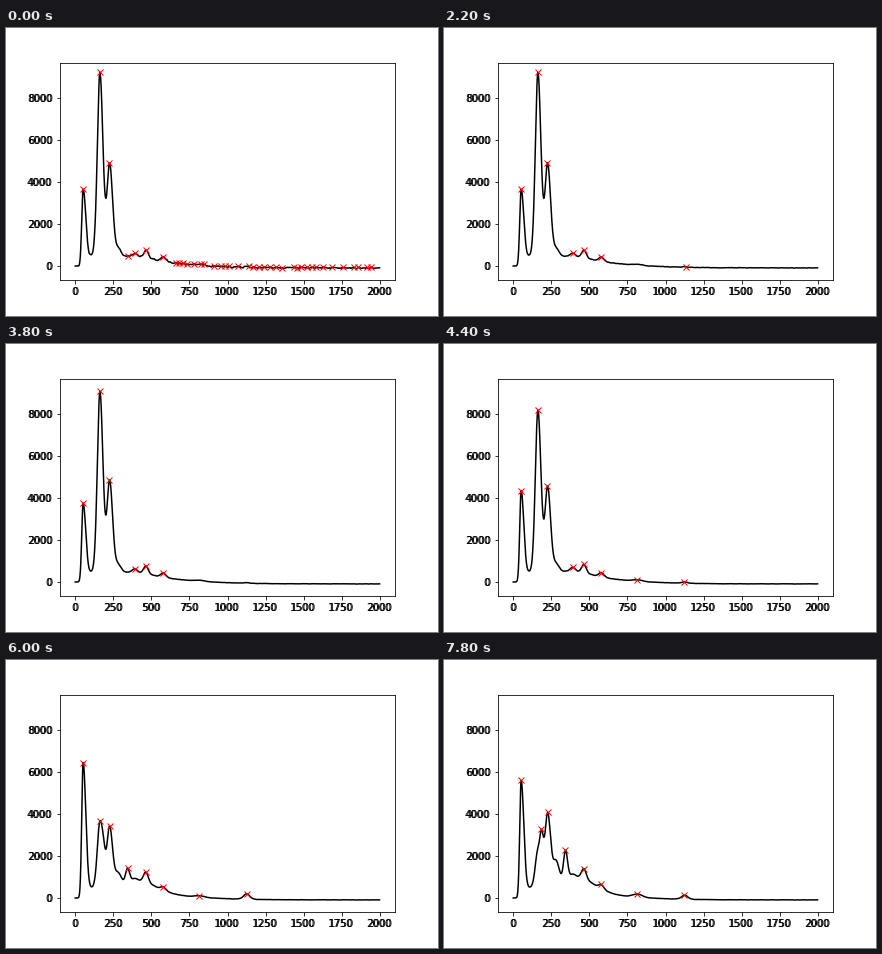
A matplotlib script for the animation above (8 s loop, 432 by 288 pixels).

```python
import numpy as np
import matplotlib.pyplot as plt
from matplotlib.animation import FuncAnimation

FRAMES = 40
INTERVAL = 200
MIN_PROMINENCE = 25

# Each peak: centre, width, then its height at the four stages
PEAKS = np.array([
    (52, 25, 3640, 6180, 6430, 5580),
    (162, 28, 8720, 4950, 3100, 1730),
    (187, 18, 0, 250, 700, 1690),
    (226, 27, 4380, 3150, 2850, 3450),
    (280, 29, 370, 430, 560, 1050),
    (343, 19, 0, 40, 650, 1360),
    (390, 26, 190, 280, 120, 150),
    (420, 160, 100, 300, 500, 680),
    (463, 23, 380, 480, 490, 485),
    (578, 24, 200, 195, 150, 190),
    (815, 45, 45, 130, 70, 150),
    (1125, 30, 20, 150, 250, 190)])

x = np.arange(1999)
centers, widths = PEAKS[:, :1], PEAKS[:, 1:2]
# Rising flanks are steeper, most of all for the first peaks
flanks = np.where(x < centers, widths * (1 - 25 / centers), widths)
shapes = np.exp(-((x - centers) / flanks) ** 2)

base = 615 * np.exp(-(x / 650) ** 2) - 90
base /= 1 + np.exp((85 - x) / 10)

rng = np.random.default_rng(4)
noise = np.convolve(rng.standard_normal(x.size), np.hanning(19), "same")
noise /= noise.std()


def ramp(i, first, last):
    return np.clip((i - first) / (last - first), 0, 1)


def spectrum(i):
    stage = ramp(i, 17, 26) ** 2.2 + ramp(i, 26, 30) + ramp(i, 30, 39)
    k = min(int(stage), 2)
    now, then = PEAKS[:, 2 + k], PEAKS[:, 3 + k]
    heights = now + (stage - k) * (then - now)
    return base + heights @ shapes + (3 + 16 * np.exp(-i / 6)) * noise


def prominence(y, p):
    """Height of a maximum above the higher of its two side valleys."""
    valleys = []
    for side in (y[p::-1], y[p:]):
        higher = np.flatnonzero(side > y[p])
        end = higher[0] if higher.size else side.size
        valleys.append(side[:end].min())
    return y[p] - max(valleys)


def find_peaks(y):
    tops = np.flatnonzero((y[1:-1] > y[:-2]) & (y[1:-1] >= y[2:])) + 1
    return [p for p in tops if prominence(y, p) > MIN_PROMINENCE]


def add_axes(shift=0):
    ax = fig.add_axes([0.125 + shift / 432, 0.125, 0.775, 0.755],
                      facecolor="none")
    ax.set_xlim(-99.9, 2097.9)
    ax.set_ylim(-667, 9688)
    ax.set_xticks(range(0, 2001, 250))
    ax.set_yticks(range(0, 8001, 2000))
    return ax


fig = plt.figure(figsize=(6, 4), dpi=72, facecolor="white")
ax = add_axes()

# A second set of labels, one pixel to the left, makes them bold
bold = add_axes(shift=-1)
bold.tick_params(length=0, pad=7)
bold.spines[:].set_visible(False)

line, = ax.plot([], [], color="black", lw=1.5)
marks, = ax.plot([], [], "x", color="red", ms=6)


def draw(i):
    y = spectrum(i)
    spots = find_peaks(y)
    line.set_data(x, y)
    marks.set_data(spots, y[spots])
    return line, marks


anim = FuncAnimation(fig, draw, frames=FRAMES, interval=INTERVAL,
                     repeat=True, repeat_delay=0)
plt.show()
```
